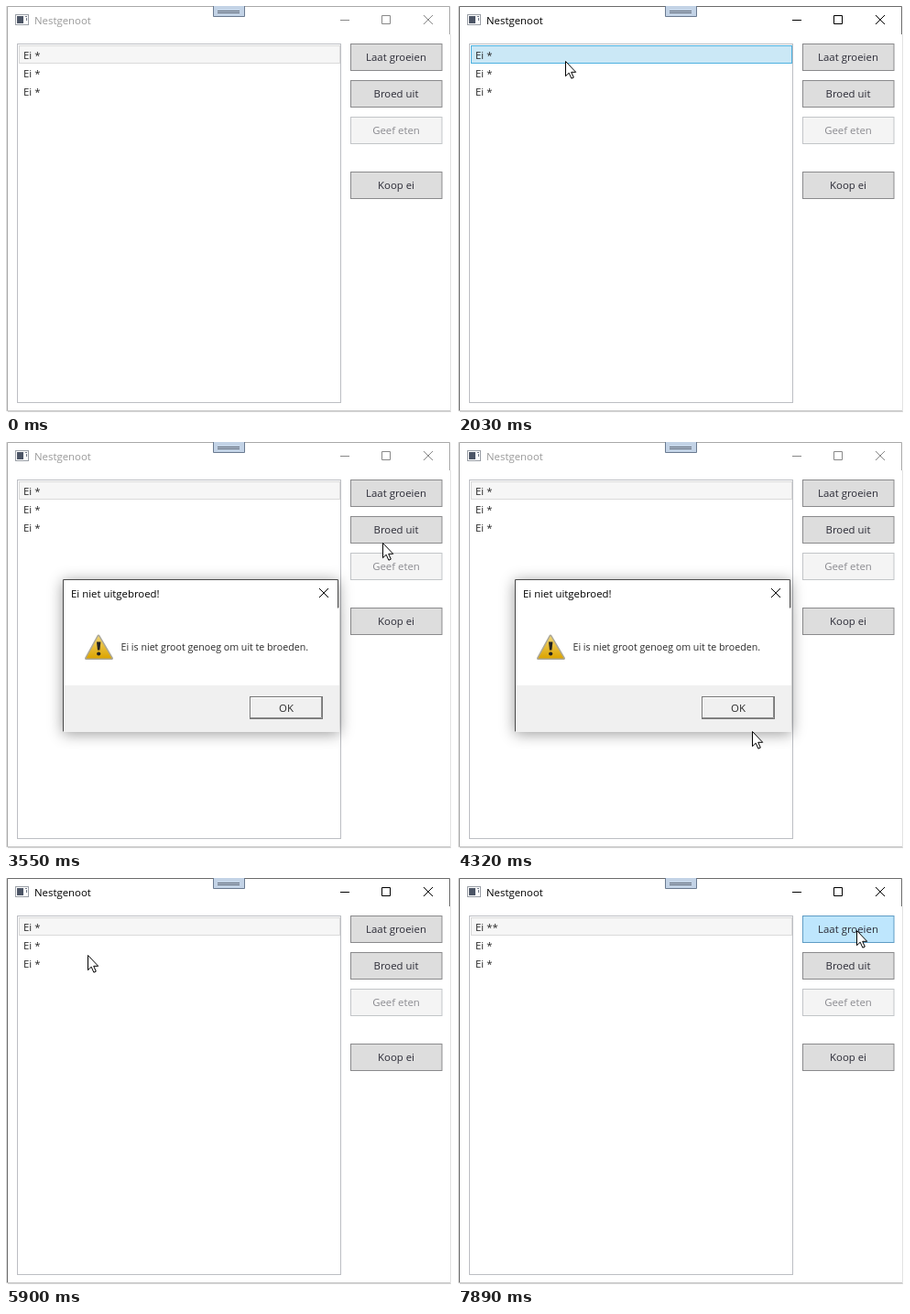
Write an HTML page that moves like this. It is 487 px wide and 446 px high and loops after 8 s.

```html
<!DOCTYPE html>
<html lang="nl">
<head>
<meta charset="utf-8">
<title>Nestgenoot</title>
<style>
  html, body { margin: 0; width: 100%; height: 100%; overflow: hidden; background: #fff; }
  svg { display: block; font: 11.4px "Open Sans", "Noto Sans", sans-serif; }
  .line { fill: none; stroke: #6b6b6b; }
  .glyph { fill: none; stroke: #000; }
  .inactive .line { stroke: #a9a9a9; }
  .inactive .glyph { stroke: #888; }
  .inactive .caption { fill: #999; }
  .button rect { fill: #ddd; stroke: #8a8a8c; }
  .button text { text-anchor: middle; fill: #2a2a35; }
  .button.hover rect { fill: #bee6fd; stroke: #5f9cc4; }
  .button.pressed rect { fill: #c4e5f6; stroke: #2c628b; }
  .button.disabled rect { fill: #f4f4f4; stroke: #c2c5c8; }
  .button.disabled text { fill: #8b8b90; }
  .row rect { fill: none; }
  .row text { fill: #2a2a2a; }
  .row.hover rect { fill: #26a0da1f; stroke: #26a0daa8; }
  .row.dim rect { fill: #f6f6f6; stroke: #dadada; }
  .row.selected rect { fill: #cbe8f6; stroke: #4db1e0; }
  #dialog { filter: drop-shadow(0 2px 8px #0006); }
</style>
</head>
<body>
<svg width="487" height="446" viewBox="0 0 487 446">
  <defs>
    <linearGradient id="gold" x2="0" y2="1">
      <stop stop-color="#f0d470"/><stop offset="1" stop-color="#dca400"/>
    </linearGradient>
  </defs>
  <g id="window">
    <path d="M.5 0V443M485.5 31V443" stroke="#e2e2e2"/>
    <path d="M2 443.5H486" stroke="#d8d8d8"/>
    <path class="line" d="M1.5 442V.5H484.5V31"/>
    <path d="M1 442.5H485" stroke="#c4c4c4"/>
    <rect x="10.5" y="9.5" width="14" height="11" fill="#fff" stroke="#9a9fa6"/>
    <path d="M12 11h7v8h-7z" fill="#4c5566"/>
    <path d="M21 11.5h2M22.5 13v3" stroke="#6f7785"/>
    <text class="caption" x="31" y="20">Nestgenoot</text>
    <path class="glyph" d="M365 15.5h10M410.5 10.5h9v9h-9zM456 10l10 10M466 10l-10 10"/>
    <path d="M226.5 0v11.5h34V0" fill="#c3d3e6" stroke="#6a7a90"/>
    <path d="M231 5.5h24M231 7.5h24" stroke="#5c6675"/>
    <rect x="12.5" y="41.5" width="353" height="392" fill="#fff" stroke="#bcbec3"/>
    <g id="rows"></g>
    <g id="buttons"></g>
  </g>
  <g id="dialog">
    <path d="M62 150h301v31h1v136H62z" fill="#fff"/>
    <path d="M63 266h301v51H63z" fill="#f0f0f0"/>
    <path d="M62.5 316.5v-166h300v31" fill="none" stroke="#4a4a4a"/>
    <text x="71" y="170">Ei niet uitgebroed!</text>
    <path d="M342 160l10 10M352 160l-10 10" stroke="#000"/>
    <path d="M101 212L115.5 236.5H87.5z" fill="none" stroke="#aca898" stroke-width="3" stroke-linejoin="round"/>
    <path d="M101 212L115.5 236.5H87.5z" fill="url(#gold)"/>
    <path d="M99 218.5h4.4l-1 9h-2.4z" fill="#222"/>
    <circle cx="101.2" cy="231.5" r="2.1" fill="#222"/>
    <text x="125.5" y="227.5" font-size="10.65" fill="#2a2a2a">Ei is niet groot genoeg om uit te broeden.</text>
    <rect x="266.5" y="278.5" width="79" height="24" fill="#f0f0f0" stroke="#777"/>
    <path d="M267.5 301V279.5H344" fill="none" stroke="#fff"/>
    <path d="M267 301.5H344.5V279" fill="none" stroke="#8a8a8a"/>
    <text x="306" y="294.5" text-anchor="middle" fill="#2a2a2a">OK</text>
  </g>
  <path id="cursor" d="M.5 .5v16.2l3.7-3.5 2.7 6 2.4-1.1-2.6-5.8h5z" fill="#fff" stroke="#000"/>
</svg>
<script>
const $ = id => document.getElementById(id);
const LOOP = 8000, STEP = 70;

$('rows').innerHTML = [0, 1, 2].map(i => `<g class="row">
  <rect x="14.5" y="${43.5 + 20 * i}" width="350" height="19"/>
  <text x="19" y="${57.5 + 20 * i}">Ei *</text></g>`).join('');

const buttonY = [41, 81, 121, 181];
$('buttons').innerHTML = ['Laat groeien', 'Broed uit', 'Geef eten', 'Koop ei'].map((label, i) => `<g class="button">
  <rect x="376.5" y="${buttonY[i] + .5}" width="99.5" height="29"/>
  <text x="426" y="${buttonY[i] + 19}">${label}</text></g>`).join('');

const rows = [...$('rows').children], buttons = [...$('buttons').children];

const glide = k => (k + k * k * (3 - 2 * k)) / 2;
const brake = k => 1 - (1 - k) ** 2;

// start time, steps, easing, from, bend, to
const moves = [
  [520, 10, glide, [445, 446], [260, 220], [96, 48]],
  [2030, 9, glide, [96, 48], [240, 140], [414, 52]],
  [2990, 3, glide, [414, 52], [415, 75], [416, 97]],
  [3550, 12, glide, [416, 97], [370, 220], [321, 316]],
  [4390, 7, glide, [321, 316], [312, 304], [305, 290]],
  [5550, 9, brake, [305, 290], [156, 207], [69, 50]],
  [6730, 5, brake, [69, 50], [250, 54], [430, 58]],
  [7080, 4, glide, [430, 58], [433, 58], [435, 57]]
];

function cursorAt(t) {
  const move = moves.findLast(m => t >= m[0]);
  if (!move) return null;
  const [start, steps, ease, a, b, c] = move;
  const u = ease(Math.min(1, (Math.floor((t - start) / STEP) + 1) / steps));
  return a.map((v, i) => (1 - u) ** 2 * v + 2 * u * (1 - u) * b[i] + u * u * c[i]);
}

const between = (v, a, b) => v >= a && v < b;

function draw(t) {
  const open = between(t, 3550, 4950);
  const active = t >= 1500 && !open;
  const listFocus = between(t, 1500, 3480) || between(t, 6460, 7750);
  const pressed = between(t, 3480, 3550) ? 1 : between(t, 7750, 7820) ? 0 : -1;

  $('window').setAttribute('class', active ? '' : 'inactive');
  $('dialog').style.display = open ? '' : 'none';

  const tip = cursorAt(t);
  $('cursor').style.display = tip ? '' : 'none';
  if (tip) $('cursor').setAttribute('transform', `translate(${tip.map(Math.round)})`);

  // hover feedback trails the pointer by one step
  const [x, y] = !open && cursorAt(t - STEP) || [-1, -1];
  rows.forEach((row, i) => {
    const over = between(x, 14, 365) && between(y, 43 + 20 * i, 63 + 20 * i);
    const state = i === 0 ? (listFocus ? 'selected' : 'dim') : over ? 'hover' : '';
    row.setAttribute('class', 'row ' + state);
  });
  rows[0].lastElementChild.textContent = t >= 7820 ? 'Ei **' : 'Ei *';
  buttons.forEach((button, i) => {
    const over = between(x, 376, 477) && between(y, buttonY[i], buttonY[i] + 30);
    const state = i === 2 ? 'disabled' : i === pressed ? 'pressed' : over ? 'hover' : '';
    button.setAttribute('class', 'button ' + state);
  });
}

function frame() {
  draw(performance.now() % LOOP);
  requestAnimationFrame(frame);
}
frame();
</script>
</body>
</html>
```
